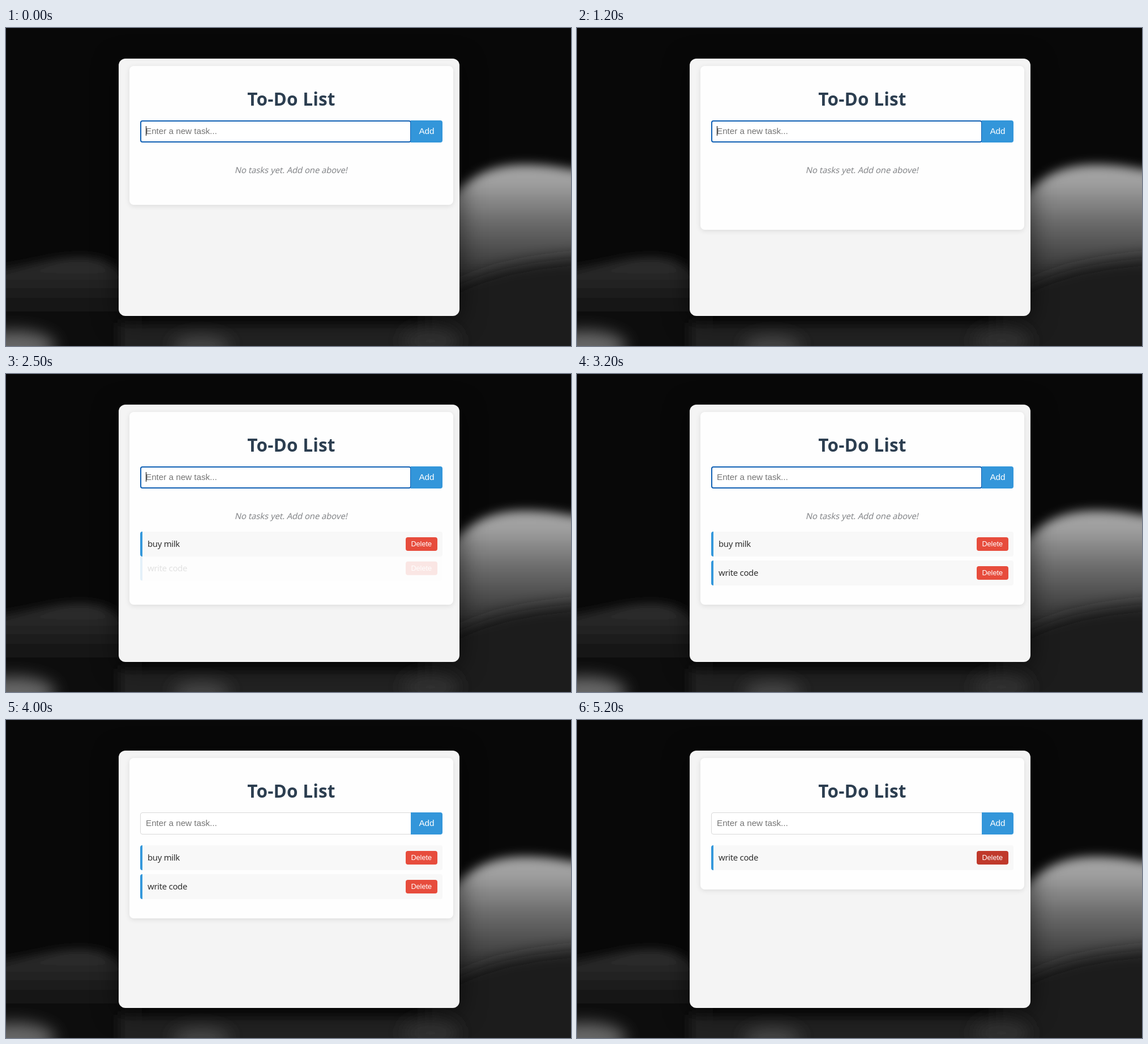
Animation, 998 px wide and 561 px high, one loop 5300 ms. Source, as an HTML page:

```html
<!DOCTYPE html>
<html lang="en">
<head>
<meta charset="utf-8">
<title>To-Do List</title>
<style>
  html, body { margin: 0; width: 100%; height: 100%; overflow: hidden; background: #080808; }
  body, .ui { font: 15.2px "Liberation Sans", Arial, sans-serif; }
  div, svg { position: absolute; box-sizing: border-box; white-space: pre; }
  svg { left: 0; top: 0; }
  .window { left: 198.5px; top: 54px; width: 602px; height: 454px; border-radius: 12px;
    background: #f4f4f4; box-shadow: 0 8px 44px rgba(0,0,0,.6); }
  .card { left: 217.5px; top: 66.5px; width: 572.5px; border-radius: 7.6px;
    background: #fefefe; box-shadow: 0 2px 10px rgba(0,0,0,.1); }
  .title, .empty, .item { font-family: "Noto Sans", "Open Sans", sans-serif; }
  .title { left: 217.5px; width: 573px; top: 105px; line-height: 40px; text-align: center;
    font-size: 31.4px; font-weight: 700; letter-spacing: .25px; color: #2c3e50; }
  .input { left: 236.5px; top: 163px; width: 479px; height: 38.5px; border: 1px solid #d9d9d9;
    border-radius: 4px 0 0 4px; background: #fff; line-height: 36.5px; padding-left: 9.5px; color: #111; }
  .input.focus { border: 2px solid #1060b4; border-radius: 4px; line-height: 34.5px; padding-left: 8.5px; }
  .hint { color: #757575; }
  .caret { display: inline-block; width: 1.3px; height: 17px; margin-right: -1.3px;
    background: #000; vertical-align: -3px; }
  .add { left: 715px; top: 163px; width: 56px; height: 38.5px; border-radius: 0 4px 4px 0;
    background: #3396da; color: #fff; line-height: 38.5px; text-align: center; }
  .empty { left: 217.5px; width: 573px; top: 238px; line-height: 24px; text-align: center;
    font-size: 14.9px; letter-spacing: -.1px; color: #85878a; transform: skewX(-12deg); }
  .item { left: 236.5px; width: 534.5px; height: 43.5px; border-left: 4px solid #3498db;
    border-radius: 4px; background: #f8f8f8; line-height: 43.5px; padding-left: 9.5px;
    font-size: 14.9px; letter-spacing: -.3px; color: #303030; }
  .delete { right: 9.5px; top: 9.5px; width: 55.5px; height: 24.5px; border-radius: 4px; color: #fff;
    font: 12.7px/24.5px "Liberation Sans", Arial, sans-serif; letter-spacing: 0; text-align: center; }
</style>
</head>
<body>
<svg width="998" height="561" viewBox="0 0 998 561">
  <defs>
    <linearGradient id="hill" gradientUnits="userSpaceOnUse" x1="0" y1="240" x2="0" y2="440">
      <stop offset="0" stop-color="#a4a4a4"/><stop offset=".16" stop-color="#a0a0a0"/>
      <stop offset=".5" stop-color="#6c6c6c"/><stop offset=".8" stop-color="#484848"/>
      <stop offset="1" stop-color="#303030"/>
    </linearGradient>
    <linearGradient id="ridge" gradientUnits="userSpaceOnUse" x1="0" y1="405" x2="0" y2="500">
      <stop offset="0" stop-color="#333"/><stop offset=".35" stop-color="#262626"/>
      <stop offset="1" stop-color="#111"/>
    </linearGradient>
    <filter id="soft" x="-30%" y="-30%" width="160%" height="160%"><feGaussianBlur stdDeviation="9"/></filter>
    <filter id="softer" x="-60%" y="-100%" width="220%" height="300%"><feGaussianBlur stdDeviation="14"/></filter>
  </defs>
  <rect width="998" height="561" fill="#080808"/>
  <path filter="url(#soft)" fill="url(#ridge)" d="M-40 430C40 422 80 406 130 406S190 420 240 450V600H-40Z"/>
  <path filter="url(#soft)" fill="#202020" d="M200 520H840V600H200Z"/>
  <path filter="url(#soft)" fill="url(#hill)" d="M770 320C810 260 860 241 915 241S990 250 1040 254V440C940 425 880 440 770 470Z"/>
  <path filter="url(#softer)" fill="#1c1c1c" d="M740 490C830 425 920 412 1050 402V620H740Z"/>
  <g filter="url(#softer)">
    <ellipse cx="15" cy="562" rx="72" ry="28" fill="#686868"/>
    <ellipse cx="345" cy="562" rx="50" ry="20" fill="#464646"/>
    <ellipse cx="750" cy="552" rx="50" ry="26" fill="#303030"/>
  </g>
</svg>
<div class="window"></div>
<div class="card"></div>
<div class="title">To-Do List</div>
<div class="input"><span class="typed"></span><span class="caret"></span><span class="hint">Enter a new task...</span></div>
<div class="add">Add</div>
<div class="empty">No tasks yet. Add one above!</div>
<div class="item">buy milk<div class="delete">Delete</div></div>
<div class="item">write code<div class="delete">Delete</div></div>
<script>
const LOOP = 5300, FADE = 300, PITCH = 51;
const RELOAD = 3425, HOVER = 4250, REMOVE = 4640;
const tasks = [
  { text: "buy milk", start: 200, step: 115, enter: 1200 },
  { text: "write code", start: 1840, step: 58, enter: 2465 },
];
const find = name => document.querySelector("." + name);
const [card, input, typed, caret, hint, empty] =
  ["card", "input", "typed", "caret", "hint", "empty"].map(find);
const items = [...document.querySelectorAll(".item")];
const clamp = x => Math.min(1, Math.max(0, x));

// CSS "ease": cubic-bezier(.25, .1, .25, 1)
function ease(x) {
  const bezier = (a, b, u) => 3 * a * u * (1 - u) ** 2 + 3 * b * u * u * (1 - u) + u ** 3;
  let low = 0, high = 1;
  for (let i = 0; i < 20; i++) {
    const mid = (low + high) / 2;
    if (bezier(.25, .25, mid) < x) low = mid; else high = mid;
  }
  return bezier(.1, 1, high);
}
const progress = (t, start) => ease(clamp((t - start) / FADE));

function drawInput(t) {
  const focused = t < RELOAD;
  let text = "", lastKey = 0;
  for (const { text: full, start, step, enter } of tasks) {
    if (t >= enter) lastKey = enter;
    else if (t >= start) {
      const count = Math.min(full.length, 1 + Math.floor((t - start) / step));
      text = full.slice(0, count);
      lastKey = start + (count - 1) * step;
    }
  }
  input.classList.toggle("focus", focused);
  typed.textContent = text;
  hint.hidden = text !== "";
  caret.style.visibility = focused && (t - lastKey) % 1000 < 500 ? "visible" : "hidden";
}

function drawList(t) {
  const reloaded = t >= RELOAD;
  const listTop = reloaded ? 221 : 278;
  let row = 0;
  items.forEach((item, i) => {
    const shown = t >= tasks[i].enter && !(i === 0 && t >= REMOVE);
    item.style.display = shown ? "" : "none";
    if (!shown) return;
    const fade = progress(t, reloaded ? RELOAD : tasks[i].enter);
    item.style.top = listTop + PITCH * row++ + "px";
    item.style.opacity = fade;
    item.style.transform = `translateY(${-9.5 * (1 - fade)}px)`;
    const hover = progress(t, i === 0 ? HOVER : REMOVE);
    const mix = (a, b) => a + (b - a) * hover;
    item.lastChild.style.background = `rgb(${mix(231, 192)},${mix(76, 57)},${mix(60, 43)})`;
  });
  empty.hidden = reloaded;
  card.style.height = (row ? listTop + PITCH * row + 26.5 : 312) - 66.5 + "px";
}

function draw(now) {
  const t = now % LOOP;
  drawInput(t);
  drawList(t);
  requestAnimationFrame(draw);
}
draw(0);
</script>
</body>
</html>
```
